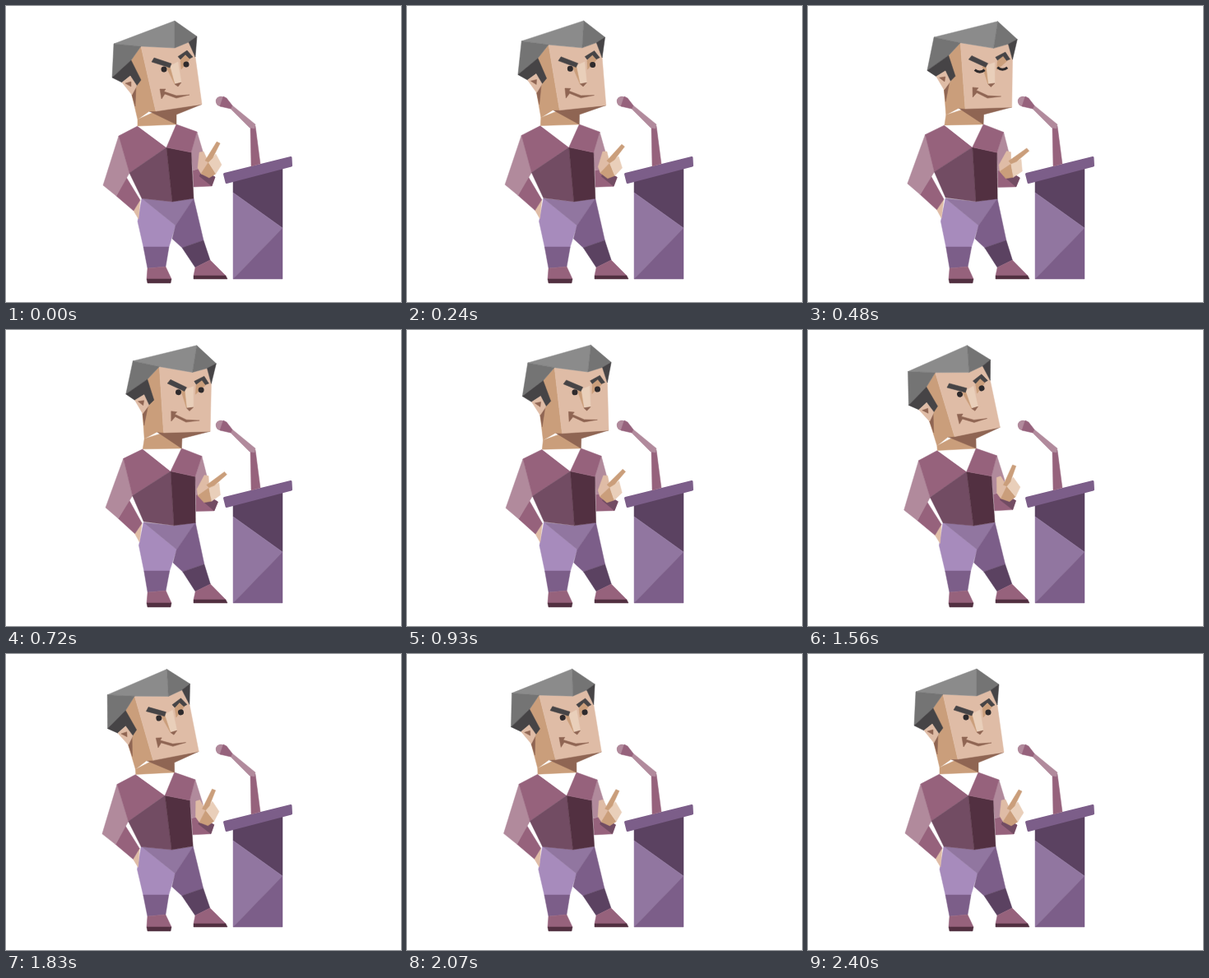
Animation, 480 px wide and 360 px high, one loop 3000 ms. Source, as an HTML page:

```html
<!DOCTYPE html>
<html lang="en">
<head>
<meta charset="utf-8">
<title>Speaker at a lectern</title>
<style>
  html, body { margin: 0; width: 100%; height: 100%; overflow: hidden; background: #fff; }
  svg { display: block; width: 480px; height: 360px; }
</style>
</head>
<body>
<svg id="stage" viewBox="0 0 480 360"></svg>
<script>
const NS = 'http://www.w3.org/2000/svg';
const stage = document.getElementById('stage');
const LOOP = 3000, STEP = 30, REST = 2400;

const C = {
  mauve: '#96627c', pale: '#b18a9c', vest: '#724c63', wine: '#523041',
  lilac: '#a78bbc', purple: '#9176a0', violet: '#7c5e89', plum: '#5b4261',
  skin: '#dfbca6', light: '#e9cfba', tan: '#ca9e7b', brown: '#8f6553',
  grey: '#8b8b8b', mid: '#747474', dark: '#464446', ink: '#2e2a2c', white: '#fff'
};

// Joints of the upright pose, grouped by the part that carries them.
const joints = {
  legs: {
    hipL: [165, 234], hipM: [202, 238], hipR: [228, 234], thigh: [160, 262], crotch: [206, 267],
    kneeL: [167, 293], kneeM: [198, 293], gap: [202, 283], kneeIn: [214, 294], kneeR: [240, 285],
    ankleL: [172, 319], ankleM: [194, 317], calfIn: [230, 318], calfR: [248, 309],
    heelL: [171, 332], toeL: [201, 332], soleL: [172, 337], soleM: [200, 337],
    heelR: [228, 328], toeR: [267, 328], soleR: [269, 332], soleIn: [228, 332]
  },
  body: {
    shoulderL: [137, 158], collarL: [160, 146], vee: [195, 172], side: [150, 203],
    collarR: [207, 144], shoulderR: [232, 153], armpit: [225, 178],
    waistL: [165, 234], waistM: [202, 238], waistR: [228, 234],
    elbow: [118, 218], elbowIn: [134, 231], bend: [146, 208], wristIn: [163, 236], wrist: [155, 249],
    palm: [161, 259], sleeve: [241, 183], sleeveIn: [227, 200], foreTop: [237, 197],
    cuffTop: [238, 200], cuff: [254, 208], cuffIn: [235, 207], foreEnd: [250, 219], foreLow: [228, 220]
  },
  hand: {
    thumb: [235, 178], thumbTip: [240, 177], knuckle: [246, 190], heel: [242, 205], back: [233, 197],
    base: [242, 188], tip: [256, 165], tipR: [260, 167], baseR: [251, 185],
    fist: [255, 180], fistR: [262, 193], fistLow: [255, 204], under: [247, 209], underL: [237, 204]
  },
  head: {
    peak: [205, 18], hairL: [131, 46], hairR: [232, 37], burnL: [129, 87], burnR: [230, 62],
    fringe: [205, 51], browL: [164, 49], temple: [152, 66], browR: [222, 44],
    lobe: [164, 90], notch: [158, 98], earTop: [151, 85], earL: [141, 93], earR: [159, 97], earLow: [153, 108],
    earA: [145, 94], earB: [152, 92], earC: [152, 98], cheek: [157, 122],
    jaw: [182, 128], jawL: [174, 128], chin: [238, 119.5], nape: [160, 138],
    bridge: [195, 75], bridgeM: [199, 73], bridgeR: [209, 68], noseL: [205, 95], noseR: [213, 93], noseLow: [209, 98],
    lidIn: [212, 66], lidTop: [218, 58], lidOut: [224, 64], lidLow: [213, 77],
    b1: [177, 68], b2: [180, 63], b3: [201, 70], b4: [199, 75],
    c1: [209, 61.5], c2: [220, 54], c3: [227, 62], c4: [223, 64], c5: [218, 59], c6: [212, 65],
    m1: [187, 101], m2: [194, 101], m3: [192, 104], m4: [207, 109], m5: [223, 108], m6: [207, 112], m7: [193, 107], m8: [189, 113]
  },
  still: {
    deskL: [276, 211], deskR: [336, 196], foldL: [276, 227], foldR: [336, 270], footL: [276, 332], footR: [336, 332],
    slabL: [265.5, 204.5], slabR: [346, 184.5], slabLow: [346.5, 194], slabIn: [268, 214.5],
    post: [297, 147], postR: [303, 146], rootR: [309, 192], root: [298, 195],
    rodA: [271, 123], rodB: [275, 121], rodC: [303, 144], rodD: [302, 149], rodE: [296, 148],
    micA: [264, 110], micB: [268, 112], micC: [273, 125], micD: [260, 122]
  }
};

// Facets from back to front.
const facets = `
lilac hipL thigh kneeL kneeM crotch
purple hipL hipM hipR crotch
violet hipR crotch gap kneeIn kneeR
plum kneeIn kneeR calfR calfIn
violet kneeL kneeM ankleM ankleL
mauve ankleL ankleM toeL heelL
mauve calfIn calfR toeR heelR
wine heelL toeL soleM soleL
wine heelR toeR soleR soleIn
skin wristIn wrist palm
mauve bend wristIn wrist elbowIn
pale shoulderL elbow elbowIn side
mauve sleeveIn foreTop cuff foreEnd foreLow
vest cuffTop cuff foreEnd cuffIn
pale shoulderR sleeve foreTop sleeveIn armpit
mauve shoulderL collarL vee side
vest side vee waistM waistL
wine vee armpit waistR waistM
white collarL collarR vee
mauve collarR shoulderR armpit vee
skin thumb thumbTip knuckle heel underL back
tan knuckle fistLow under underL
light fist fistR fistLow knuckle
tan base tip tipR baseR knuckle
tan nape collarL collarR jaw
brown jawL chin neck collarR
tan temple browL jaw jawL nape earLow
brown earLow notch cheek
skin browL fringe browR burnR chin jaw
grey hairL peak fringe browL
mid peak hairR browR fringe
mid hairL browL temple burnL
dark burnL temple lobe notch earTop earL
dark hairR burnR browR
skin earL earTop earR earLow
brown earA earB earC
tan lidIn lidTop lidOut lidLow
light bridgeM bridgeR noseR noseL
tan bridge bridgeM noseL
brown noseL noseR noseLow
dark b1 b2 b3 b4
dark c1 c2 c3 c4 c5 c6
brown m1 m2 m3 m4 m5 m6 m7 m8
plum foldL deskL deskR foldR
purple foldL foldR footL
violet foldR footR footL
violet slabL slabR slabLow slabIn
mauve post postR rootR root
pale rodA rodB rodC rodD rodE
mauve micA micB rodB micC micD`;
joints.body.neck = [207, 132];

function add(tag, attrs) {
  const el = document.createElementNS(NS, tag);
  for (const k in attrs) el.setAttribute(k, attrs[k]);
  return stage.appendChild(el);
}

add('circle', { cx: 261, cy: 116, r: 6.2, fill: C.pale });
const polys = facets.trim().split('\n').map(line => {
  const [colour, ...names] = line.split(' ');
  const el = add('polygon', {
    fill: C[colour], stroke: C[colour], 'stroke-linejoin': 'round',
    'stroke-width': names[0] === 'slabL' ? 3 : 0.5
  });
  return { el, names };
});

const eyes = [[192, 77], [219, 71]].map(([x, y]) => ({
  x, y,
  ball: add('circle', { r: 3.5, fill: C.ink }),
  lid: add('path', { d: 'M-6 2Q0 7 6 2', fill: 'none', stroke: C.ink, 'stroke-width': 3 })
}));

const ease = u => (1 - Math.cos(Math.PI * u)) / 2;
const keys = [[0, 0], [600, 1.1], [1600, -0.46], [REST, 0]];

// Sway: 0 upright, positive towards the microphone.
function sway(t) {
  if (t >= REST) return 0;
  const i = keys.findIndex(k => t < k[0]);
  const [t0, a] = keys[i - 1], [t1, b] = keys[i];
  return a + (b - a) * ease((t - t0) / (t1 - t0));
}

function turn(x, y, cx, cy, deg) {
  const a = deg * Math.PI / 180, c = Math.cos(a), s = Math.sin(a);
  const dx = x - cx, dy = y - cy;
  return [cx + dx * c - dy * s, cy + dx * s + dy * c];
}

// p sways the figure, q swings the hand slightly ahead of it.
function movers(p, q) {
  return {
    still: (x, y) => [x, y],
    legs: (x, y) => [x + p * Math.max(0, 325 - y) / 45, y],
    body: (x, y) => [x + p * (2 + (238 - y) / 23), y + p * (x - 210) * 0.022],
    head: (x, y) => {
      const [u, v] = turn(x, y, 212, 185, 8.8 * p);
      return [u, y + (v - y) * 0.75];
    },
    hand: (x, y) => {
      const [u, v] = turn(x, y, 246, 188, q * (q > 0 ? 22 : 15));
      return [u + q * (q > 0 ? 1.5 : 10), v + Math.max(0, q) * 2];
    }
  };
}

function draw(t) {
  const p = sway(t);
  const move = movers(p, sway(Math.min(t + 40, REST)));
  const at = {};
  for (const part in joints) {
    for (const name in joints[part]) at[name] = move[part](...joints[part][name]);
  }
  for (const { el, names } of polys) {
    el.setAttribute('points', names.map(n => at[n].map(v => v.toFixed(2))).join(' '));
  }
  const shut = t >= 420 && t < 540;
  for (const { x, y, ball, lid } of eyes) {
    const [cx, cy] = move.head(x, y);
    const tilt = `translate(${cx} ${cy}) rotate(${8.8 * p - 8})`;
    ball.setAttribute('transform', tilt);
    lid.setAttribute('transform', tilt);
    ball.style.display = shut ? 'none' : '';
    lid.style.display = shut ? '' : 'none';
  }
}

function tick() {
  const t = performance.now() % LOOP;
  draw(Math.floor(t / STEP) * STEP);
  requestAnimationFrame(tick);
}
tick();
</script>
</body>
</html>
```
